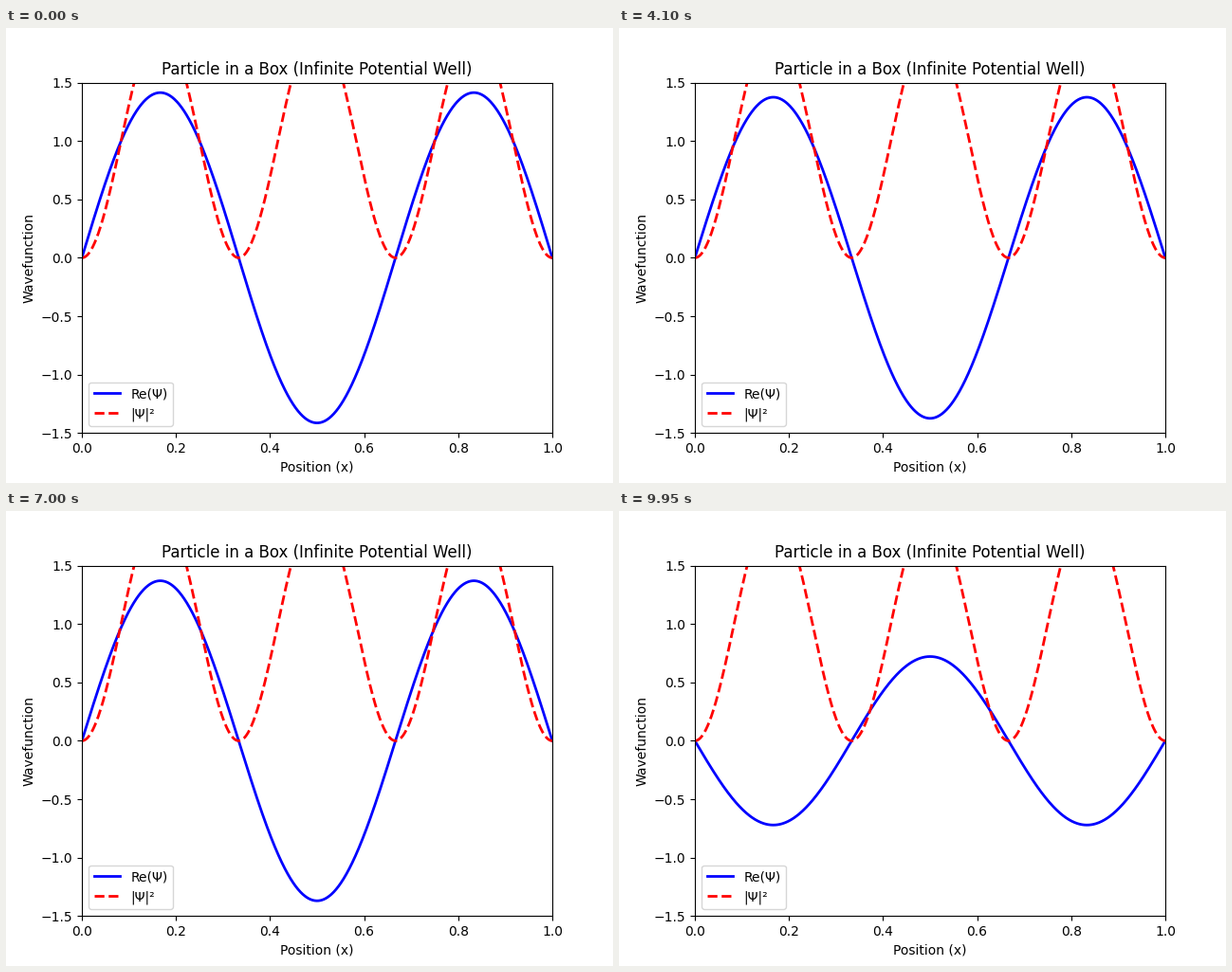
Animation of 640x480 px, one loop 10000 ms. Source, as a matplotlib script:

```python
import numpy as np
import matplotlib.pyplot as plt
from matplotlib.animation import FuncAnimation

N = 3                                # quantum number
L = 1.0                              # box width (hbar = m = 1)
ENERGY = (N * np.pi / L) ** 2 / 2
FRAMES = 200
INTERVAL = 50                        # ms
DT = 0.1                             # model time per frame

x = np.linspace(0, L, 1000)
phi = np.sqrt(2 / L) * np.sin(N * np.pi * x / L)

fig, ax = plt.subplots(figsize=(6.4, 4.8), dpi=100)
ax.set_xlim(0, L)
ax.set_ylim(-1.5, 1.5)
ax.set_title("Particle in a Box (Infinite Potential Well)")
ax.set_xlabel("Position (x)")
ax.set_ylabel("Wavefunction")

real_line, = ax.plot(x, phi, "b-", lw=2, label="Re(Ψ)")
prob_line, = ax.plot(x, phi ** 2, "r--", lw=2, label="|Ψ|²")
# "best" is re-evaluated on every draw, so the legend dodges the wave
ax.legend(loc="best")


def update(frame):
    psi = phi * np.exp(-1j * ENERGY * frame * DT)
    real_line.set_ydata(psi.real)
    prob_line.set_ydata(np.abs(psi) ** 2)
    return real_line, prob_line


anim = FuncAnimation(fig, update, frames=FRAMES, interval=INTERVAL,
                     repeat=True, repeat_delay=0, blit=False)
plt.show()
```
